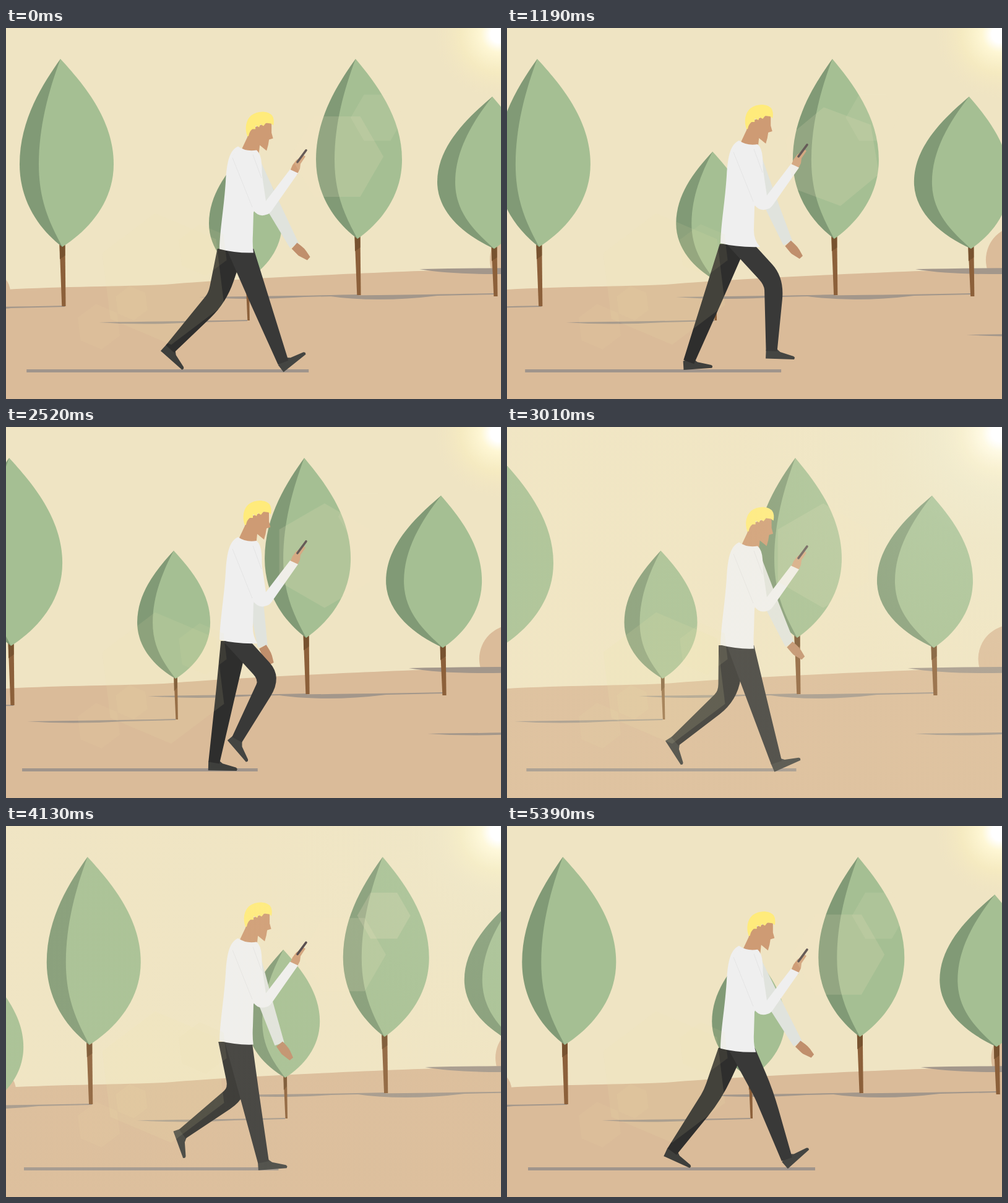
Recreate the animation shown at these times as an HTML page. Size 800 px wide and 600 px high, loop 5460 ms.

```html
<!DOCTYPE html>
<html lang="en">
<head>
<meta charset="utf-8">
<title>Walking with a phone</title>
<style>
html, body { margin: 0; width: 100%; height: 100%; overflow: hidden; background: #efe4c3; }
svg { display: block; width: 100vw; height: 100vh; }
</style>
</head>
<body>
<svg id="stage" viewBox="0 0 800 600" preserveAspectRatio="none">
  <defs>
    <radialGradient id="sun">
      <stop offset="0" stop-color="#fff"/>
      <stop offset=".13" stop-color="#fff"/>
      <stop offset=".28" stop-color="#fff8d6" stop-opacity=".95"/>
      <stop offset=".6" stop-color="#f8edc0" stop-opacity=".7"/>
      <stop offset="1" stop-color="#f3e6c2" stop-opacity="0"/>
    </radialGradient>
    <radialGradient id="glare" gradientUnits="userSpaceOnUse" cx="800" cy="10" r="900"></radialGradient>
  </defs>
</svg>
<script>
const NS = 'http://www.w3.org/2000/svg';
const LOOP = 5460, STEP = 70, STRIDE = 1470, CUT = 3520;
const TAU = 2 * Math.PI, RAD = Math.PI / 180;
const SHADOW = '#a3978b', SKY = '#efe4c3';
const stage = document.getElementById('stage');

function add(tag, attrs, parent = stage) {
  const el = document.createElementNS(NS, tag);
  set(el, attrs);
  parent.appendChild(el);
  return el;
}
function set(el, attrs) {
  for (const k in attrs) el.setAttribute(k, attrs[k]);
}
const path = (d, fill, parent) => add('path', { d, fill }, parent);
const clamp = v => Math.max(0, Math.min(1, v));
const mix = (a, b, k) => [a[0] + (b[0] - a[0]) * k, a[1] + (b[1] - a[1]) * k];
const polar = (p, deg, r) => [p[0] + r * Math.sin(deg * RAD), p[1] + r * Math.cos(deg * RAD)];
const pt = p => p[0].toFixed(2) + ',' + p[1].toFixed(2);
const polygon = points => 'M' + points.map(pt).join('L') + 'Z';

// Smooth closed curve through evenly spaced keys
function cycle(keys, u) {
  const n = keys.length, f = (u - Math.floor(u)) * n;
  const i = Math.floor(f), s = f - i;
  const [a, b, c, d] = [-1, 0, 1, 2].map(k => keys[(i + k + n) % n]);
  return b.map((v, j) => v + s / 2 * (c[j] - a[j] +
    s * (2 * a[j] - 5 * v + 4 * c[j] - d[j] + s * (3 * (v - c[j]) + d[j] - a[j]))));
}

// Tapered limb with a rounded middle joint; level gives it a horizontal top
function limb(a, b, c, ra, rb, rc, level) {
  const normal = (p, q) => {
    const l = Math.hypot(q[0] - p[0], q[1] - p[1]) || 1;
    return [(q[1] - p[1]) / l, (p[0] - q[0]) / l];
  };
  const n1 = normal(a, b), n2 = normal(b, c);
  const sum = [n1[0] + n2[0], n1[1] + n2[1]];
  const len = Math.hypot(...sum) || 1;
  const nb = [sum[0] / len, sum[1] / len];
  const reach = rb * Math.min(1.35, 2 / len);
  const off = (p, n, r) => [p[0] + n[0] * r, p[1] + n[1] * r];
  const side = s => [off(a, level ? [1, 0] : n1, s * ra), off(b, nb, s * reach), off(c, n2, s * rc)];
  const [a1, b1, c1] = side(1), [a2, b2, c2] = side(-1);
  return `M${pt(a1)}L${pt(mix(a1, b1, .6))}Q${pt(b1)} ${pt(mix(b1, c1, .3))}L${pt(c1)}` +
    `L${pt(c2)}L${pt(mix(b2, c2, .08))}Q${pt(b2)} ${pt(mix(a2, b2, .85))}L${pt(a2)}Z`;
}

// Knee between hip and ankle, bent forward
function bend(hip, ankle, thigh, shin) {
  const dx = ankle[0] - hip[0], dy = ankle[1] - hip[1], d = Math.hypot(dx, dy);
  if (d >= thigh + shin) return mix(hip, ankle, thigh / (thigh + shin));
  const along = (thigh * thigh - shin * shin + d * d) / (2 * d);
  const out = Math.sqrt(thigh * thigh - along * along);
  return [hip[0] + (dx * along + dy * out) / d, hip[1] + (dy * along - dx * out) / d];
}

const hexagon = (x, y, r, turn) =>
  polygon(Array.from({ length: 6 }, (_, i) => polar([x, y], 90 - turn - i * 60, r)));

// Scenery
add('rect', { width: 800, height: 600, fill: SKY });
add('circle', { cx: 797, cy: 10, r: 105, fill: 'url(#sun)' });
const distant = add('g', {});
add('circle', { cx: 837, cy: 375, r: 55, fill: '#dbbc9a' }, distant);
add('circle', { cx: -25, cy: 427, r: 32, fill: '#dbbc9a' }, distant);
path('M0,423C90,418 190,418 255,415C350,407 520,398 800,388V600H0Z', '#dabb99');
const hollow = add('g', {});
path('M668,390Q740,402 870,396V388Q760,388 668,390Z', SHADOW, hollow);
const middle = add('g', {}), front = add('g', {});

function shadow(parent, x, y, len, depth) {
  const l = x - len, lens = len * .66, r = l + lens;
  path(`M${x},${y - 1}Q${(x + r) / 2},${y} ${r - 20},${y + 1}Q${l + lens / 2},${y + 2} ${l},${y + 3}` +
    `Q${l + lens * .45},${y + 3 + depth * 2} ${r},${y + 3}L${x},${y + 1}Z`, SHADOW, parent);
}

function tree(parent, x, top, h, left, right, inner, trunk, w) {
  const b = x + 3, bottom = top + h, mid = top + h * .56, end = bottom + trunk;
  const edge = (dx, low) => `C${x + dx * .42},${top + h * .13} ${x + dx},${mid - h * .24} ${x + dx},${mid}` +
    `C${x + dx},${mid + h * .2} ${b + dx * low},${bottom - h * .09} ${b},${bottom}`;
  path(`M${b - w},${bottom - 4}H${b + w}L${b + w + 1},${end}H${b + 2 - w * .6}Z`, '#8c603a', parent);
  path(`M${b - w},${bottom - 4}H${b + w}V${bottom + 14}L${b - w + .5},${bottom + 20}Z`, '#77522f', parent);
  path(`M${x},${top}${edge(left, .55)}Z`, '#819a76', parent);
  path(`M${x},${top}${edge(right, .5)}C${b + inner * .55},${bottom - h * .12} ${x + inner},${mid + h * .2} ` +
    `${x + inner},${mid}C${x + inner},${mid - h * .2} ${x + inner * .55},${top + h * .17} ${x},${top}Z`, '#a5bf93', parent);
}

shadow(middle, 95, 450, 255, 5);
shadow(middle, 570, 432, 258, 3);
shadow(middle, 790, 430, 273, 6);
tree(middle, 88, 50, 304, -66, 86, -35, 96, 4.5);
tree(middle, 565, 50, 291, -64, 75, -34, 91, 4.5);
tree(middle, 786, 111, 246, -89, 66, -60, 77, 4.5);
shadow(front, 390, 473, 240, 2.5);
shadow(front, 1037, 493, 240, 2.5);
tree(front, 387, 200, 207, -59, 59, -34, 66, 2.8);
tree(front, -99, 232, 224, -66, 66, -36, 54, 3.5);

const ground = add('rect', { y: 552, height: 5, fill: '#a0958c' });

// Walker
const farArm = path('', '#e0e3dd'), farHand = path('', '#c08f6c');
const farFoot = path('', '#3e3f3c'), farLeg = path('', '#2e2e2d');
const nearFoot = path('', '#444542'), nearLeg = path('', '#393938');
const head = add('g', {});
path('M387,148L425,134V153L427.5,162L421,164L419.5,173L417,182L406,173L404,192H372L378,177L386,160Z', '#ce9b74', head);
path('M386,159C381,145 384,132 392,125C402,117 419,117 426,125Q430,131 428,141L424,138L416,137L412,142' +
  'L407,139L405,144L399,141L399,147L394,147Q389,151 388,158Z', '#ffeb7b', head);
const shirt = path('', '#efefef');
const phoneArm = add('g', {});
path('M458,221L463,209L469,201L481,193L484,195L476,207L475,215L470,225Z', '#cf9d77', phoneArm);
add('path', { d: 'M471,204L485,185', stroke: '#4b4044', 'stroke-width': 3.6, 'stroke-linecap': 'round' }, phoneArm);
path('M366,192L399,281Q408,294 421,289Q426,288 430,282L472,222L459,216L420,267L409,192Q385,180 366,192Z', '#efefef', phoneArm);
add('path', { d: 'M366,197L398,277M399,192L413,230', stroke: '#e4e4e4', fill: 'none' }, phoneArm);

// Ankle x, y and foot angle at each eighth of a stride, from heel strike
const ANKLE = [
  [448, 541, -38], [401, 544, 4], [314, 542, -1], [281, 536, 0],
  [265, 519, 42], [299, 495, 73], [400, 512, 35], [445, 533, -30]
];
const SOLE = [[-9, -2], [8, -4], [14, 1], [36, 7], [38, 9], [37, 12], [-9, 12.5]];

function leg(shape, foot, u, drop) {
  const [x, y, deg] = cycle(ANKLE, u);
  const hip = [371 + (x - 358) * .08, 346 + drop * .8], ankle = [x, y];
  set(shape, { d: limb(hip, bend(hip, ankle, 82, 113), ankle, 22, 16, 9, true) });
  const c = Math.cos(deg * RAD), s = Math.sin(deg * RAD);
  set(foot, { d: polygon(SOLE.map(([a, b]) => [x + a * c - b * s, y + a * s + b * c])) });
}

function swingArm(u, drop) {
  const a = TAU * (u + .066);
  const deg = 35 * Math.cos(a) - 3.5 * Math.cos(2 * a) - 1.5;
  const shoulder = [392, 200 + drop], wrist = polar(shoulder, deg, 157), tip = polar(wrist, deg + 20, 31);
  set(farArm, { d: limb(shoulder, mix(shoulder, wrist, .56), wrist, 17, 11.5, 8) });
  set(farHand, { d: limb(wrist, mix(wrist, tip, .5), tip, 6.5, 7.5, 3.5) });
}

function walk(time) {
  const u = time / STRIDE;
  // the body dips and the ground line widens once per step
  const beat = Math.cos(2 * TAU * (u + .05));
  const drop = 16 * ((1 + beat) / 2) ** 1.5;
  leg(nearLeg, nearFoot, u, drop);
  leg(farLeg, farFoot, u + .5, drop);
  swingArm(u, drop);

  set(head, { transform: `translate(${drop * .3},${drop * 1.2})` });
  set(phoneArm, { transform: `translate(0,${drop * .93})` });
  const hem = 404 - 5 * Math.cos(2 * TAU * (u - .05));
  set(shirt, {
    transform: `translate(0,${drop * .98})`,
    d: `M375,178C362,184 357,200 355,235C352,280 346,310 345,344Q372,351 ${hem},350` +
      'Q398,338 399,320L400,285C412,260 415,225 413,205Q412,190 405,184Q388,187 375,178Z'
  });
  const left = 30 + 4 * beat;
  set(ground, { x: left, width: 452 + 46 * beat - left });
}

// Flash and lens reflections
const glare = document.getElementById('glare');
const stops = Array.from({ length: 5 }, () => add('stop', {}, glare));
const veil = add('rect', { width: 800, height: 600, fill: 'url(#glare)' });
const flares = [[254, 406, 107, .11], [318, 359, 42, .08], [150, 483, 37, .07], [203, 445, 28, .07]]
  .map(([x, y, r, alpha]) => ({ el: path(hexagon(x, y, r, -97)), alpha }));
const drift = path('', SKY), spark = path('', SKY);

function shine(t, time) {
  const k = t < 3600 ? clamp((t - 2640) / 790) ** 2 : clamp(1 - (t - 3600) / 900) ** 2.2;
  const surge = 3 * k ** 3;
  for (const f of flares) set(f.el, {
    'fill-opacity': Math.min(1, f.alpha + surge),
    fill: surge > .2 ? '#fff' : '#e8dfa8'
  });
  set(drift, {
    d: hexagon(535 - time * .008, 208, 75 + Math.min(time, 1900) * .005, 30 * clamp(time / 1750)),
    'fill-opacity': .16
  });
  set(spark, { d: hexagon(600 - time * .008, 145, 43, 0), 'fill-opacity': .12 + k * .7 });

  set(veil, { visibility: k > 0 ? 'visible' : 'hidden' });
  const core = 980 * k * k, r = core + 380, haze = k ** 1.25;
  const lift = a => Math.min(1, haze + a * clamp(k * 1.5));
  const full = k > .99;
  set(glare, { r });
  [
    [0, '#fff', Math.min(1, k * 2.5)],
    [core / r, '#fff', lift(.4)],
    [(core + 45) / r, '#f7ffec', lift(.34)],
    [(core + 130) / r, '#f3f5da', lift(.2)],
    [1, '#f9efc9', haze]
  ].forEach(([offset, color, alpha], i) => set(stops[i], {
    offset, 'stop-color': full ? '#fff' : color, 'stop-opacity': full ? 1 : alpha
  }));
}

function draw(ms) {
  const t = Math.floor(ms % LOOP / STEP) * STEP;
  // the scene jumps while the screen is white
  const time = t < CUT ? t : t - LOOP;
  const slide = (el, speed) => set(el, { transform: `translate(${-time * speed},0)` });
  slide(distant, .0068);
  slide(hollow, .0068);
  slide(middle, .0329);
  slide(front, .046);
  walk(time);
  shine(t, time);
}

const start = performance.now();
function tick() {
  draw(performance.now() - start);
  requestAnimationFrame(tick);
}
tick();
</script>
</body>
</html>
```
